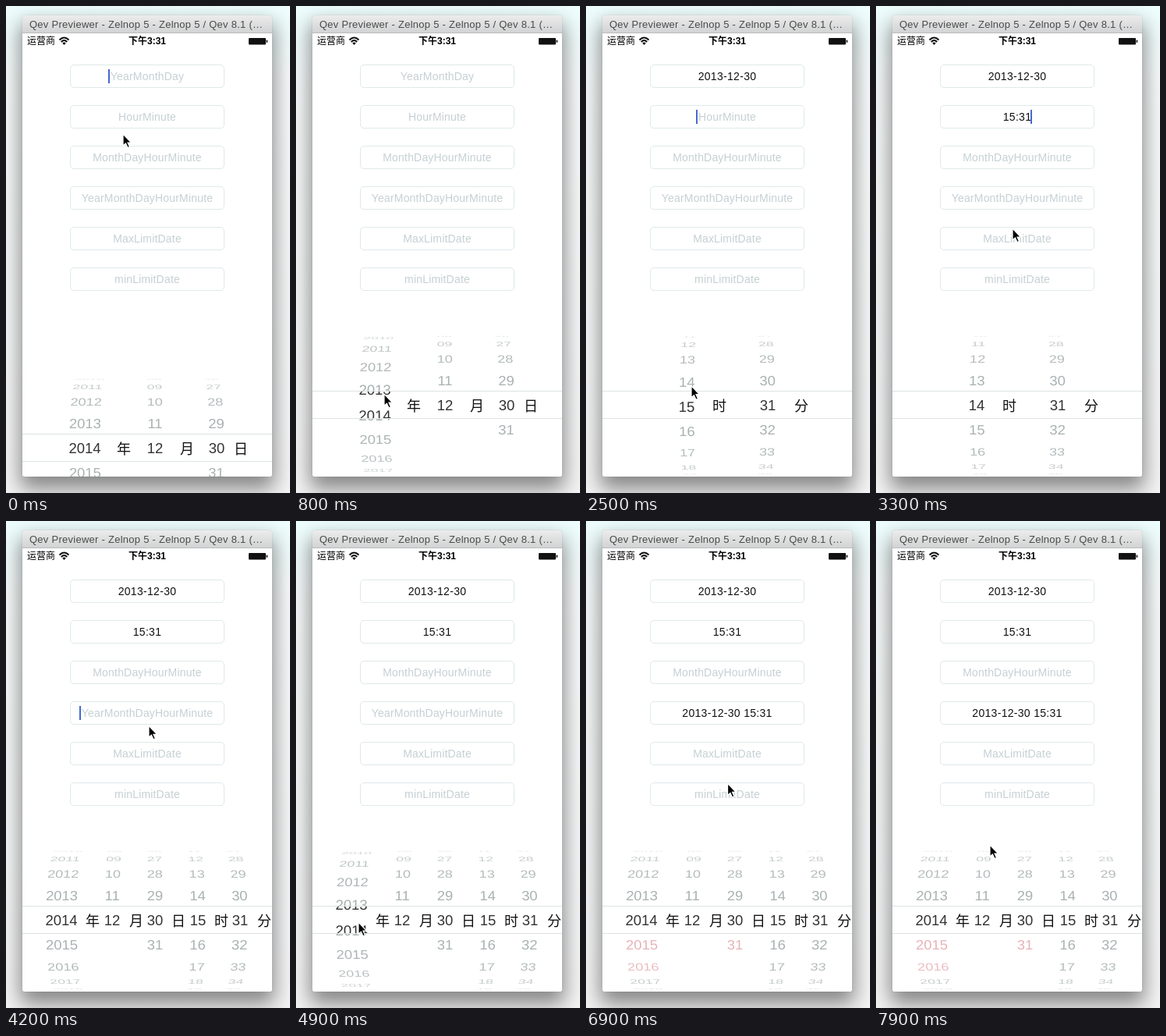
Recreate the animation shown at these times as an HTML page with a canvas. Size 364x624 px, loop 8 s.

```html
<!DOCTYPE html>
<html lang="zh">
<head>
<meta charset="utf-8">
<title>Date pickers</title>
<style>
html, body { margin: 0; width: 100%; height: 100%; overflow: hidden; }
body { background: linear-gradient(#edfdfd, #f7fafa 90px, #f4f4f5); font: 14px "Liberation Sans", Arial, sans-serif; }
#stage { position: relative; width: 364px; height: 624px; overflow: hidden; }
#stage * { position: absolute; box-sizing: border-box; white-space: nowrap; }
#window { left: 21px; top: 12px; width: 320px; height: 591px; background: #fff; border-radius: 4px 4px 2px 2px;
  box-shadow: 0 13px 26px 3px rgba(0,0,0,.45), 0 0 1px rgba(0,0,0,.4); }
#bar { left: 0; top: 0; width: 320px; height: 23px; border-radius: 4px 4px 0 0;
  background: linear-gradient(#ececec, #d2d3d4); border-bottom: 1px solid #b9bcbd; }
#title { left: 9px; top: 4px; font-size: 13px; line-height: 16px; letter-spacing: .26px; color: #4a4a4a; }
.status { top: 25px; line-height: 16px; font-size: 12px; font-family: "Liberation Sans", "Noto Sans CJK SC", "Noto Sans CJK", sans-serif; }
.field { left: 82px; width: 198px; height: 30px; border: 1px solid #dfe9ea; border-radius: 5px;
  text-align: center; line-height: 28px; color: #c5d0d3; letter-spacing: .18px; }
.field.set { color: #111; letter-spacing: .3px; }
.field.caret:not(.set)::before, .field.caret.set::after {
  content: ""; display: inline-block; width: 2px; height: 18px; background: #4669d0; vertical-align: -4px; }
.field.caret:not(.set)::before { margin: 0 1px 0 -3px; }
.field.caret.set::after { margin: 0 -1px; }
canvas, svg { left: 0; top: 0; }
</style>
</head>
<body>
<div id="stage">
  <div id="window">
    <div id="bar"><div id="title">Qev Previewer - Zelnop 5 - Zelnop 5 / Qev 8.1 (…</div></div>
    <div class="status" style="left:6px">运营商</div>
    <div class="status" style="left:0;width:320px;text-align:center;font-weight:bold">下午3:31</div>
  </div>
  <canvas id="wheels" width="364" height="624"></canvas>
  <svg width="364" height="624">
    <g fill="none" stroke="#111" stroke-width="2">
      <path d="M68.5 43.5Q74.5 37.500 80.500 43.500M70.800 46Q74.500 42 78.200 46"/>
      <path d="M74.500 50l-2.200-2.600q2.200-1.600 4.400 0z" fill="#111" stroke="none"/>
    </g>
    <rect x="311" y="41" width="22" height="8.500" rx="1" fill="#111"/>
    <rect x="333.700" y="43.500" width="1.500" height="3.500" rx=".7" fill="#111"/>
  </svg>
  <svg id="mouse" width="20" height="24" viewBox="-2 -2 20 24" style="z-index:2">
    <path d="M0 0V15L3.400 12L6 17.500L8.500 16.500L6 11H10.500Z" fill="#000" stroke="#fff" stroke-width="1.200"/>
  </svg>
</div>
<script>
const LOOP = 8000, STEP = 100;
const MID = 181, CY = 511.5, R = 88, ANGLE = .37;
const TOP = 493, BOTTOM = 528;
const stage = document.getElementById('stage');
const mouse = document.getElementById('mouse');
const ctx = document.getElementById('wheels').getContext('2d');

// index of each field that receives a value: [time, text]
const values = { 0: [1200, '2013-12-30'], 1: [2900, '15:31'], 3: [5300, '2013-12-30 15:31'] };
const names = ['YearMonthDay', 'HourMinute', 'MonthDayHourMinute',
  'YearMonthDayHourMinute', 'MaxLimitDate', 'minLimitDate'];
const fields = names.map((name, i) => {
  const el = document.createElement('div');
  el.style.top = 75 + 52 * i + 'px';
  stage.insertBefore(el, mouse);
  return el;
});

// [time, focused field]
const focus = [[0, 0], [1900, 1], [4100, 3], [6100, 4]];

// [time, x, y] of the pointer tip
const path = [
  [0, 150, 164], [650, 113, 485], [1000, 113, 516], [1100, 113, 516],
  [1700, 194, 140], [1900, 194, 140], [2450, 135, 485], [2800, 135, 516], [2900, 135, 516],
  [3300, 175, 285], [3800, 190, 246], [4100, 190, 246], [4750, 80, 502], [5100, 80, 533], [5250, 80, 533],
  [5800, 210, 431], [6050, 198, 300], [6300, 198, 300], [7900, 146, 415]
];

const ease = p => (p = Math.min(1, Math.max(0, p)), p * p * (3 - 2 * p));
const drag = (t, start) => ease((t - start) / 350);

function pointer(t) {
  const i = path.findIndex(k => k[0] > t);
  if (i < 0) return path[path.length - 1].slice(1);
  const [t0, x0, y0] = path[i - 1], [t1, x1, y1] = path[i];
  const p = ease((t - t0) / (t1 - t0));
  return [x0 + (x1 - x0) * p, y0 + (y1 - y0) * p];
}

const wheel = (x, value, max, label, labelX) => ({ x, value, max, label, labelX });

function picker(field, t) {
  if (field === 0) return [
    wheel(101, 2014 - drag(t, 650), 2100, '年', 151),
    wheel(191, 12, 12, '月', 232),
    wheel(270, 30, 31, '日', 301)];
  if (field === 1) return [
    wheel(129, 15 - drag(t, 2450), 23, '时', 171),
    wheel(233, 31, 59, '分', 276)];
  return [
    wheel(71, field === 3 ? 2014 - drag(t, 4750) : 2014, 2100, '年', 111),
    wheel(136, 12, 12, '月', 167),
    wheel(191, 30, 31, '日', 221),
    wheel(246, 15, 23, '时', 276),
    wheel(300, 31, 59, '分', 331)];
}

function drawRows(wheels, limited, selected, y, h) {
  ctx.save();
  ctx.beginPath();
  ctx.rect(21, y, 320, h);
  ctx.clip();
  ctx.font = '18.5px "Liberation Sans", Arial, sans-serif';
  for (const { x, value, max } of wheels) {
    for (let n = Math.round(value) - 4; n <= Math.min(max, Math.round(value) + 4); n++) {
      const a = (n - value) * ANGLE;
      if (Math.abs(a) > 1.53) continue;
      const s = 1 - .08 * (1 - Math.cos(a));
      const red = limited && (n === 2015 || n === 2016 || (n === 31 && max === 31));
      ctx.save();
      ctx.globalAlpha = selected ? 1 : .3 + .58 * Math.cos(a);
      ctx.fillStyle = selected ? '#333' : red ? '#e2a3a9' : '#98a2a3';
      // the row sits on a cylinder seen in slight perspective
      ctx.transform(s, 0, -(x - MID) * .08 * Math.sin(a) / R, Math.cos(a),
        MID + (x - MID) * s, CY + R * Math.sin(a));
      ctx.fillText(String(n).padStart(2, '0'), 0, 6.6);
      ctx.restore();
    }
  }
  ctx.restore();
}

function drawPicker(field, t) {
  const wheels = picker(field, t), limited = field === 4;
  const slide = 55 * (1 - Math.min(1, t / 300)) ** 2;
  ctx.clearRect(0, 0, 364, 624);
  ctx.save();
  ctx.beginPath();
  ctx.rect(21, 400, 320, 203);
  ctx.clip();
  ctx.translate(0, slide);
  ctx.textAlign = 'center';
  drawRows(wheels, limited, false, 422, TOP - 422);
  drawRows(wheels, limited, false, BOTTOM, 73);
  drawRows(wheels, limited, true, TOP, BOTTOM - TOP);
  ctx.fillStyle = '#dde3e3';
  ctx.fillRect(21, TOP, 320, 1);
  ctx.fillRect(21, BOTTOM, 320, 1);
  ctx.fillStyle = '#111';
  ctx.font = '18px "Noto Sans CJK SC", "Noto Sans CJK", sans-serif';
  for (const { label, labelX } of wheels) ctx.fillText(label, labelX, CY + 7);
  ctx.restore();
}

function render(t) {
  const [since, active] = focus.filter(f => f[0] <= t).pop();
  const lit = (t - since) % 1000 < 750;
  fields.forEach((el, i) => {
    const set = values[i] && t >= values[i][0];
    el.textContent = set ? values[i][1] : names[i];
    el.className = 'field' + (set ? ' set' : '') + (lit && i === active ? ' caret' : '');
  });
  drawPicker(active, t);
  const [x, y] = pointer(t);
  mouse.style.transform = `translate(${x - 2}px, ${y - 2}px)`;
}

function frame() {
  render(Math.floor(performance.now() % LOOP / STEP) * STEP);
  requestAnimationFrame(frame);
}
frame();
</script>
</body>
</html>
```
